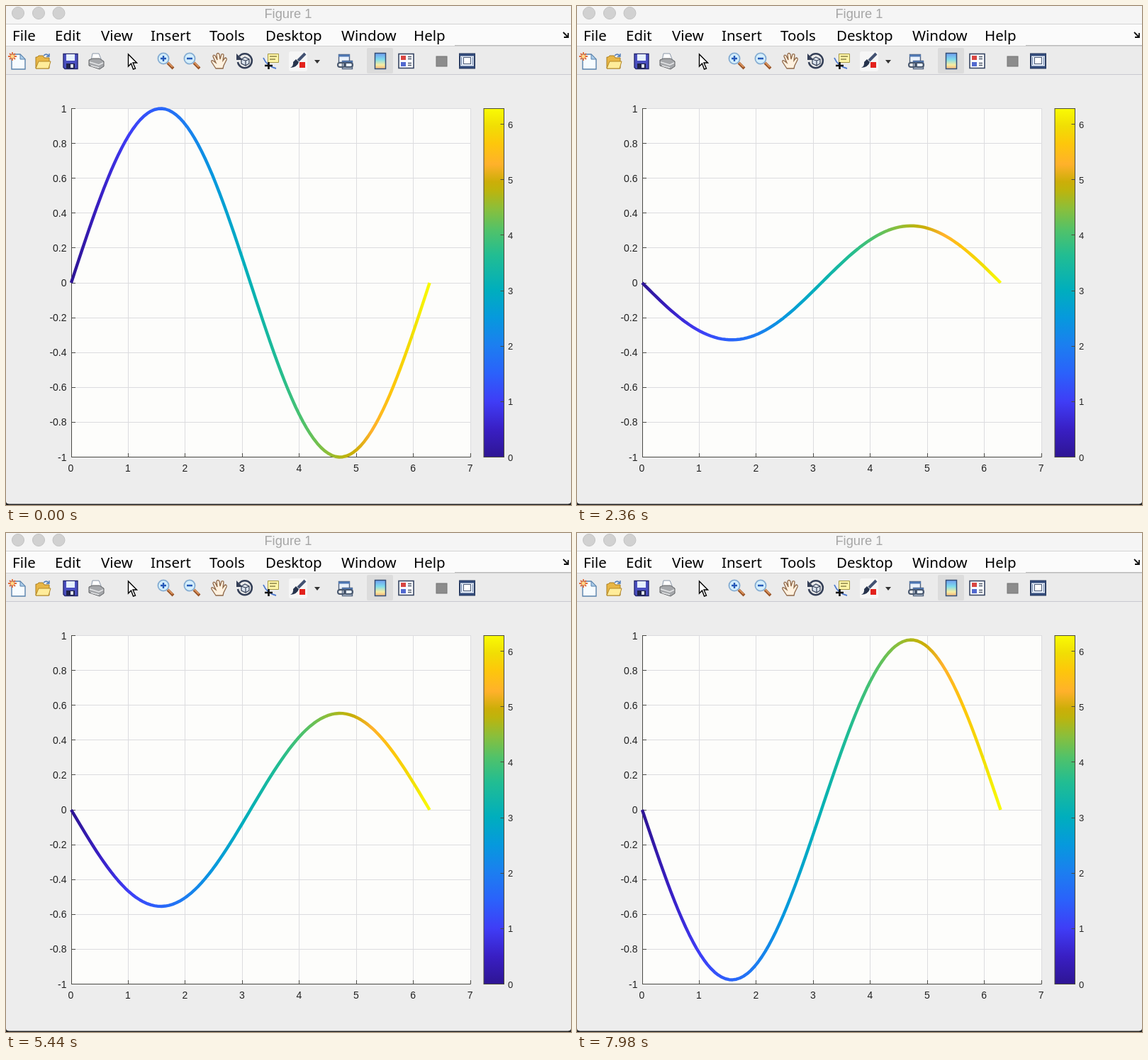
Animation of 797x703 px, one loop 8000 ms. Source, as an HTML page:

```html
<!DOCTYPE html>
<html lang="en">
<head>
<meta charset="utf-8">
<title>Figure 1</title>
<style>
  html, body { margin: 0; width: 100%; height: 100%; overflow: hidden; background: #ededed; }
  svg { display: block; }
  text { font-family: "Liberation Sans", Arial, sans-serif; fill: #222; }
  .menu text { font: 20.5px "Noto Sans", sans-serif; fill: #000; }
</style>
</head>
<body>
<svg width="797" height="703" viewBox="0 0 797 703">
  <defs>
    <linearGradient id="curveColors" gradientUnits="userSpaceOnUse" x1="92" y1="0" x2="597.3" y2="0"></linearGradient>
    <linearGradient id="barColors" x1="0" y1="1" x2="0" y2="0"></linearGradient>
    <linearGradient id="miniBar" x1="0" y1="0" x2="0" y2="1">
      <stop stop-color="#6f9df0"/><stop offset=".4" stop-color="#7fdcec"/>
      <stop offset=".75" stop-color="#f8eda0"/><stop offset="1" stop-color="#f3b37a"/>
    </linearGradient>
    <g id="lens" fill="none">
      <path d="M6 6 14 14" stroke="#9a5528" stroke-width="4"/>
      <path d="M6 5 13 12" stroke="#e8a067" stroke-width="1.5"/>
      <circle r="7.6" fill="#d5effc" stroke="#86add2" stroke-width="1.8"/>
    </g>
  </defs>

  <!-- window frame -->
  <rect width="797" height="25" fill="#f5f5f5"/>
  <g fill="#d1d1d1" stroke="#c3c3c3">
    <circle cx="17" cy="10" r="8.5"/><circle cx="46" cy="10" r="8.5"/><circle cx="74.500" cy="10" r="8.5"/>
  </g>
  <text x="398" y="17" font-size="18.3" text-anchor="middle" style="fill:#a6a6a6">Figure 1</text>
  <rect y="25" width="797" height="31" fill="#fbfbfb"/>
  <path d="M0 25.500H797" stroke="#d4d4d4"/>
  <path d="M0 56.500H797" stroke="#d0d0d0"/>
  <path d="M633 55.500H797" stroke="#bcbcbc"/>
  <g class="menu" id="menu"></g>
  <path d="M786 37l6 6M793 38v6h-6" fill="none" stroke="#111" stroke-width="1.8"/>
  <rect y="57" width="797" height="39" fill="#ebebeb"/>
  <path d="M0 96.500H797" stroke="#c9c9d0"/>
  <path d="M0 698q0 3 4 3.500H793q4-.5 4-3.500v5H0z" fill="#222"/>

  <!-- toolbar: new, open, save, print -->
  <path d="M8 68H20l7 7V89H8z" fill="#f7fcff" stroke="#5a83ad" stroke-width="1.4"/>
  <path d="M20 68v7h7z" fill="#a9cbe8" stroke="#5a83ad"/>
  <path d="M9 65v12M3 71h12M5 67l8 8M13 67l-8 8" stroke="#e06a38" stroke-width="1.8"/>
  <circle cx="9" cy="71" r="2.5" fill="#ffd989"/>
  <path d="M42 88V72h2l2-2h6l2 3h7v15z" fill="#e8b645" stroke="#a77d20"/>
  <path d="M42 88l4-10h17l-3 10z" fill="#ffec9a" stroke="#b48928"/>
  <path d="M53 70q4-4 7 0m1-3v4h-4" fill="none" stroke="#4b79b8" stroke-width="1.4"/>
  <path d="M81 67.500h20v21H83l-2-2z" fill="#4a4fc0" stroke="#25286f" stroke-width="1.4"/>
  <path d="M85 68h12v9H85z" fill="#e6f1ff"/><path d="M85 81h12v7H85z" fill="#202348"/><path d="M91 82h4v5h-4z" fill="#dfe3f3"/>
  <path d="M120 77l2-10h9l4 10z" fill="#fff" stroke="#8b98a8"/>
  <path d="M117 76l5-2h10l6 4v7l-6 4-15-5z" fill="#a5a7aa" stroke="#606265"/>
  <path d="M118 79l13 4 6-3M120 84l11 3" fill="none" stroke="#e5e6e8" stroke-width="1.6"/>

  <!-- pointer, zoom, pan, rotate -->
  <path d="M172.500 68v17l4-4 3 8 3-1-3.500-8h5.500z" fill="#fff" stroke="#000" stroke-width="1.4"/>
  <use href="#lens" x="222" y="74"/><use href="#lens" x="259" y="74"/>
  <path d="M218 74h8M222 70v8M255 74h8" stroke="#2559b8" stroke-width="2.4"/>
  <path d="M296 88l-6-9q-1-3 2-2l4 3-4-9q0-3 3-1l3 6-1-8q2-3 4 0l1 7 2-7q3-1 3 1l-1 8 3-4q3 0 2 3l-4 8-1 4z" fill="#fff1df" stroke="#8f6848" stroke-width="1.3"/>
  <path d="M329 71a10 10 0 1 1-2 8" fill="none" stroke="#343f57" stroke-width="2.6"/>
  <path d="M325 67v9h9z" fill="#343f57"/>
  <path d="M332 75l5-3 6 3v6l-5 3-6-3zM332 75l6 2 5-2M338 77v7" fill="#dce4ee" stroke="#3c475e" stroke-width="1.3"/>

  <!-- data tip, brush, link -->
  <path d="M369.500 67.500h15v12h-15z" fill="#fff5a8" stroke="#a39745"/>
  <path d="M372 71h10M372 75h8" stroke="#8a8248" stroke-width="1.4"/>
  <path d="M363 73q5 12 18 15" fill="none" stroke="#4c78cd" stroke-width="1.8"/>
  <path d="M365 84h11M370.500 79v10" stroke="#111" stroke-width="2.6"/>
  <rect x="399" y="64" width="26" height="28" rx="3" fill="#f6f6f6"/>
  <path d="M422 67l-10 10" stroke="#435272" stroke-width="4"/>
  <path d="M409 75l4 4q-2 7-12 8 5-3 4-8z" fill="#27344d"/>
  <rect x="414" y="79" width="8" height="8" fill="#e3221c"/>
  <path d="M435 76h8l-4 5z" fill="#333"/>
  <path d="M469.500 68.500h15v11h-15zM474.500 77.500h14v11h-14z" fill="#eaf2fc" stroke="#50627d" stroke-width="1.4"/>
  <path d="M469 70h16M474 79h15" stroke="#4f78b5" stroke-width="3"/>
  <g fill="none" stroke="#47566c" stroke-width="2"><rect x="468" y="80" width="11" height="6" rx="3"/><rect x="477" y="80" width="12" height="6" rx="3"/></g>

  <!-- colour bar, legend, plot tools -->
  <rect x="509" y="59" width="37" height="36" rx="2" fill="#dcdcdc"/>
  <rect x="520.500" y="66.500" width="15" height="22" fill="url(#miniBar)" stroke="#334d75" stroke-width="1.5"/>
  <rect x="554" y="67.500" width="21" height="20" fill="#f9fbff" stroke="#394763" stroke-width="1.6"/>
  <path d="M557 70h7v6h-7z" fill="#d84642"/><path d="M557 79h7v6h-7z" fill="#5269cf"/>
  <path d="M567 71.500h5M567 74.500h5M567 80.500h5M567 83.500h5" stroke="#515968" stroke-width="1.3"/>
  <rect x="607" y="71" width="15" height="14" fill="#8c8c8c" stroke="#747474"/>
  <rect x="640" y="67.500" width="21" height="20" fill="#e5edf9" stroke="#293b60" stroke-width="2"/>
  <path d="M640 69h21M640 86h21" stroke="#344d7d" stroke-width="3"/>
  <rect x="645.500" y="72.500" width="10" height="9" fill="#fff" stroke="#4e5d78"/>
  <path d="M642.500 72v11M658.500 72v11" stroke="#6c83aa"/>

  <!-- plot -->
  <rect x="92" y="144" width="563.500" height="491.500" fill="#fdfdfb"/>
  <path id="grid" stroke="#dcdcdf"/>
  <path id="ticks" fill="none" stroke="#4a4a46"/>
  <g id="labels" font-size="14"></g>
  <path id="curve" fill="none" stroke="url(#curveColors)" stroke-width="4.4" stroke-linejoin="round"/>
  <rect x="674" y="144.500" width="28.500" height="491" fill="url(#barColors)" stroke="#4c4b3c"/>
  <path id="barTicks" stroke="#4c4b3c"/>
</svg>
<script>
const el = id => document.getElementById(id);
const px = x => 92 + x * 563.2 / 7;
const py = y => 390 - y * 245.5;
const crisp = v => Math.floor(v) + 0.5;

function addText(parent, x, y, content, attributes = '') {
  parent.insertAdjacentHTML('beforeend', `<text x="${x}" y="${y}" ${attributes}>${content}</text>`);
}

const palette = [
  [0, '#2e1593'], [.08, '#391fc4'], [.16, '#3f3df6'], [.24, '#2b61fb'], [.32, '#1c7ef0'],
  [.4, '#0699dd'], [.48, '#00aebd'], [.58, '#22bd92'], [.65, '#50c26a'], [.71, '#88bf3d'],
  [.765, '#bdb40d'], [.79, '#ccae08'], [.84, '#ffb12b'], [.9, '#fdc70b'], [.95, '#f1de04'], [1, '#f9fb04']
];
const stops = palette.map(([at, color]) => `<stop offset="${at}" stop-color="${color}"/>`).join('');
el('curveColors').innerHTML = el('barColors').innerHTML = stops;

const menuItems = { File: 9, Edit: 69, View: 134, Insert: 204, Tools: 287, Desktop: 366, Window: 473, Help: 575 };
for (const [name, x] of Object.entries(menuItems)) addText(el('menu'), x, 49, name);

let grid = '', ticks = 'M92.5 144V635.5H655.5', barTicks = '';
for (let i = 0; i <= 7; i++) {
  const x = crisp(px(i));
  if (i) grid += `M${x} 144V635`;
  ticks += `M${x} 635.5v-5.5`;
  addText(el('labels'), px(i) - .5, 655.5, i, 'text-anchor="middle"');
}
for (let i = -5; i <= 5; i++) {
  const y = crisp(py(i / 5));
  if (i > -5) grid += `M92 ${y}H655.5`;
  ticks += `M92.5 ${y}h5.500`;
  addText(el('labels'), 85.5, py(i / 5) + 5, i / 5, 'text-anchor="end"');
}
for (let i = 0; i <= 6; i++) {
  const y = 635.5 - i * 491 / (2 * Math.PI);
  barTicks += `M697.5 ${crisp(y)}h5`;
  addText(el('labels'), 708, y + 5, i, 'font-size="13"');
}
el('grid').setAttribute('d', grid);
el('ticks').setAttribute('d', ticks);
el('barTicks').setAttribute('d', barTicks);

// The wave advances unevenly: [picture index, phase step].
const pace = [[0, 0], [22, 29], [50, 69], [75, 109], [116, 164], [137, 198], [171, 251]];

// Pictures are held for 20, 100 and 20 ms in turn.
function pictureIndex(ms) {
  const rest = ms % 140;
  return 3 * Math.floor(ms / 140) + (rest >= 120 ? 2 : rest >= 20 ? 1 : 0);
}

function phaseStep(index) {
  const next = Math.max(1, pace.findIndex(([at]) => at >= index));
  const [a, from] = pace[next - 1], [b, to] = pace[next];
  return Math.round(from + (to - from) * (index - a) / (b - a));
}

function draw() {
  const step = phaseStep(pictureIndex(performance.now() % 8000));
  const amplitude = Math.cos(step * 2 * Math.PI / 99);
  const points = Array.from({ length: 100 }, (_, i) => {
    const x = i * 2 * Math.PI / 99;
    return `${px(x).toFixed(2)} ${py(amplitude * Math.sin(x)).toFixed(2)}`;
  });
  el('curve').setAttribute('d', 'M' + points.join('L'));
  requestAnimationFrame(draw);
}
draw();
</script>
</body>
</html>
```
